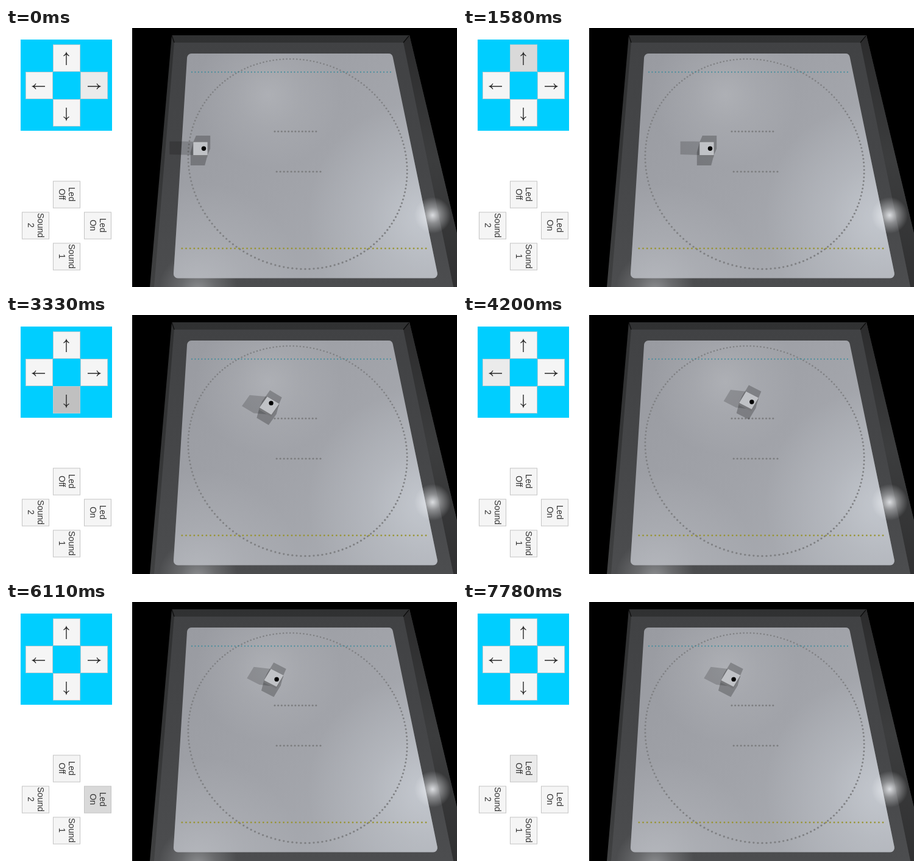
Recreate the animation shown at these times as an HTML page with a canvas. Size 740 by 426 pixels, loop 8260 ms.

```html
<!DOCTYPE html>
<html lang="en">
<head>
<meta charset="utf-8">
<title>Robot cube controller</title>
<style>
  html, body { margin: 0; width: 100%; height: 100%; overflow: hidden; background: #fff; }
  canvas { display: block; }
</style>
</head>
<body>
<canvas id="stage" width="740" height="426"></canvas>
<script>
const ctx = document.getElementById('stage').getContext('2d');
const LOOP = 8260, TAU = Math.PI * 2, DEG = Math.PI / 180;
const NORMAL = 245, HOVER = 235, PRESSED = 192;
const clamp01 = v => Math.max(0, Math.min(1, v));
const progress = (t, from, to) => clamp01((t - from) / (to - from));

// Each button: position, content, and the times at which its shade changes.
const buttons = [
  { x: 77, y: 27, turn: -90, steps: [[1100, HOVER], [1540, PRESSED], [2100, HOVER], [2680, NORMAL]] },
  { x: 32, y: 72, turn: 180, steps: [[4000, HOVER], [4200, PRESSED], [4860, HOVER], [6000, NORMAL]] },
  { x: 122, y: 72, turn: 0, steps: [[-200, HOVER], [300, PRESSED], [1010, HOVER], [1100, NORMAL]] },
  { x: 77, y: 117, turn: 90, steps: [[2700, HOVER], [2950, PRESSED], [3840, HOVER], [4000, NORMAL]] },
  { x: 77, y: 251.5, lines: ['Led', 'Off'], steps: [[6100, HOVER], [7480, PRESSED], [7650, HOVER]] },
  { x: 128, y: 302.5, lines: ['Led', 'On'], steps: [[6000, HOVER], [6070, PRESSED], [6150, HOVER], [7500, NORMAL]] },
  { x: 26, y: 302.5, lines: ['Sound', '2'], steps: [] },
  { x: 77, y: 353.5, lines: ['Sound', '1'], steps: [] }
];

function shadeAt(steps, t) {
  let shade = NORMAL;
  for (const [time, target] of steps) shade += (target - shade) * progress(t, time, time + 100);
  return Math.round(shade);
}

function drawButton({ x, y, turn, lines, steps }, t) {
  const shade = shadeAt(steps, t);
  ctx.fillStyle = lines ? '#c4c4c4' : '#b9cdd3';
  ctx.fillRect(x, y, 45, 45);
  ctx.fillStyle = `rgb(${shade},${shade},${shade})`;
  ctx.fillRect(x + 1, y + 1, 43, 43);
  ctx.save();
  ctx.translate(x + 22, y + 22);
  if (lines) {
    ctx.rotate(Math.PI / 2);
    ctx.fillStyle = '#323232';
    ctx.font = '14px "Liberation Sans", sans-serif';
    ctx.textAlign = 'center';
    ctx.textBaseline = 'middle';
    ctx.fillText(lines[0], 0, -8);
    ctx.fillText(lines[1], 0, 8);
  } else {
    ctx.translate(0, 2);
    ctx.rotate(turn * DEG);
    ctx.strokeStyle = '#282828';
    ctx.lineWidth = 1.4;
    ctx.beginPath();
    ctx.moveTo(-10, 0); ctx.lineTo(10, 0);
    ctx.moveTo(5, -4.5); ctx.quadraticCurveTo(7, -1, 10, 0); ctx.quadraticCurveTo(7, 1, 5, 4.5);
    ctx.stroke();
  }
  ctx.restore();
}

function polygon(points, fill) {
  ctx.fillStyle = fill;
  ctx.beginPath();
  points.forEach(p => ctx.lineTo(p[0], p[1]));
  ctx.closePath();
  ctx.fill();
}

function disc(x, y, r, fill) {
  ctx.fillStyle = fill;
  ctx.beginPath();
  ctx.arc(x, y, r, 0, TAU);
  ctx.fill();
}

function gradient(x0, y0, x1, y1, ...colors) {
  const g = ctx.createLinearGradient(x0, y0, x1, y1);
  colors.forEach((c, i) => g.addColorStop(i / (colors.length - 1), c));
  return g;
}

function glow(x, y, r, rgb, alpha) {
  const g = ctx.createRadialGradient(x, y, 0, x, y, r);
  g.addColorStop(0, `rgba(${rgb},${alpha})`);
  g.addColorStop(0.45, `rgba(${rgb},${alpha * 0.45})`);
  g.addColorStop(1, `rgba(${rgb},0)`);
  ctx.fillStyle = g;
  ctx.fillRect(x - r, y - r, 2 * r, 2 * r);
}

// Perspective projection of unit-square mat coordinates.
function project(u, v) {
  const k = 337 / 434, s = k * v / (1 - (1 - k) * v);
  return [297 - 22 * s + u * (337 + 97 * s), 42 + 369 * s];
}

function dotRow(count, v, from, to, r, color) {
  for (let i = 0; i < count; i++)
    disc(...project(from + (to - from) * i / (count - 1), v), r, color);
}

function matPath() {
  const corners = [[297.5, 42], [633.5, 42], [709.5, 411.5], [274.5, 411.5]];
  ctx.beginPath();
  ctx.moveTo(465, 42);
  for (let i = 1; i <= 4; i++) ctx.arcTo(...corners[i % 4], ...corners[(i + 1) % 4], 7);
  ctx.closePath();
}

function drawArena() {
  ctx.fillStyle = '#000';
  ctx.fillRect(207, 0, 533, 426);
  polygon([[272, 12], [662, 12], [761, 426], [236, 426]], gradient(0, 12, 0, 426, '#303132', '#343536', '#404142'));
  polygon([[662, 12], [761, 426], [734, 426], [652, 24]], gradient(0, 12, 0, 426, '#2b2b2c', '#3c3d3e', '#303031'));
  polygon([[276, 24], [652, 24], [734, 426], [243, 426]], gradient(0, 24, 0, 426, '#414244', '#454648', '#4c4d4f'));
  ctx.strokeStyle = '#0c0c0c';
  ctx.lineWidth = 1.2;
  ctx.beginPath();
  ctx.moveTo(272, 12); ctx.lineTo(276, 24);
  ctx.moveTo(661, 13); ctx.lineTo(652, 24);
  ctx.stroke();
  glow(315, 432, 65, '205,207,210', 0.5);

  ctx.save();
  matPath();
  ctx.fillStyle = gradient(290, 60, 700, 380, '#999ba1', '#a1a3a9', '#acafb5');
  ctx.fill();
  ctx.clip();
  glow(430, 110, 120, '196,198,202', 0.42);
  glow(685, 310, 190, '212,217,224', 0.6);
  glow(315, 425, 170, '200,203,208', 0.5);
  ctx.restore();
  glow(700, 308, 30, '245,247,250', 0.85);

  for (let i = 0; i < 180; i++) {
    const a = i / 180 * TAU, v = 0.5 + 0.469 * Math.sin(a);
    disc(...project(0.5 + 0.469 * Math.cos(a), v), 1.25 + 0.4 * v, '#7f8083');
  }
  dotRow(13, 0.407, 0.409, 0.592, 1.45, '#7d7e80');
  dotRow(13, 0.589, 0.409, 0.594, 1.5, '#7d7e80');
  dotRow(61, 0.104, 0.0285, 0.973, 1, '#33899b');
  dotRow(61, 0.895, 0.026, 0.976, 1.35, '#98942f');
}

// Forward, arc left, arc right, then reverse.
function poseAt(t) {
  const R = 28, left = -98, right = 29;
  let heading = left * progress(t, 1600, 2300) * DEG;
  let x = 319 + 81 * progress(t, 310, 1145) - R * Math.sin(heading);
  let y = R * (Math.cos(heading) - 1);
  if (t > 3037) {
    const start = heading;
    heading += (right - left) * progress(t, 3037, 3944) * DEG;
    x += R * (Math.sin(heading) - Math.sin(start));
    y -= R * (Math.cos(heading) - Math.cos(start));
  }
  const back = 34 * progress(t, 4280, 4960);
  x -= back * Math.cos(heading);
  y -= back * Math.sin(heading);
  return { x, y: 198.3 + 0.96 * y, heading };
}

function convexHull(points) {
  const sorted = [...points].sort((a, b) => a[0] - b[0] || a[1] - b[1]);
  const cross = (o, a, b) => (a[0] - o[0]) * (b[1] - o[1]) - (a[1] - o[1]) * (b[0] - o[0]);
  const chain = list => {
    const out = [];
    for (const p of list) {
      while (out.length > 1 && cross(out.at(-2), out.at(-1), p) <= 0) out.pop();
      out.push(p);
    }
    return out.slice(0, -1);
  };
  return [...chain(sorted), ...chain(sorted.reverse())];
}

function ledColor(t) {
  if (t < 6170 || t >= 7680) return '#000';
  const a = Math.floor((t - 6170) / 100) * TAU / 29;
  const wave = v => Math.min(255, Math.round(128 + 128 * v));
  return `rgb(${wave(Math.cos(a))},${wave(Math.sin(a))},${Math.round(Math.abs(Math.cos(a)) * 128)})`;
}

function drawCube(t) {
  const { x, y, heading } = poseAt(t);
  const face = [45, 135, 225, 315].map(d => [
    x + 16.5 * Math.cos(heading + d * DEG),
    y + 15.2 * Math.sin(heading + d * DEG)
  ]);
  const sweep = (dx, dy, fill) =>
    polygon(convexHull([...face, ...face.map(p => [p[0] + dx, p[1] + dy])]), fill);
  sweep(-39 + 0.09 * (x - 319), -1 - 0.03 * (199 - y), 'rgba(0,0,0,.18)');
  sweep(4.5, -10.5, 'rgba(0,0,0,.24)');
  sweep(-4.5, 17, 'rgba(0,0,0,.25)');
  sweep(-0.5, 3.5, '#77787b');
  polygon(face, '#c0c2c6');
  disc(x + 5.5 * Math.cos(heading), y + 5.2 * Math.sin(heading), 3.7, ledColor(t));
}

function draw(t) {
  ctx.fillStyle = '#fff';
  ctx.fillRect(0, 0, 207, 426);
  ctx.fillStyle = '#00ceff';
  ctx.fillRect(24, 19, 150, 150);
  buttons.forEach(b => drawButton(b, t));
  drawArena();
  drawCube(t);
}

const began = performance.now();
function tick() {
  draw((performance.now() - began) % LOOP);
  requestAnimationFrame(tick);
}
tick();
</script>
</body>
</html>
```
